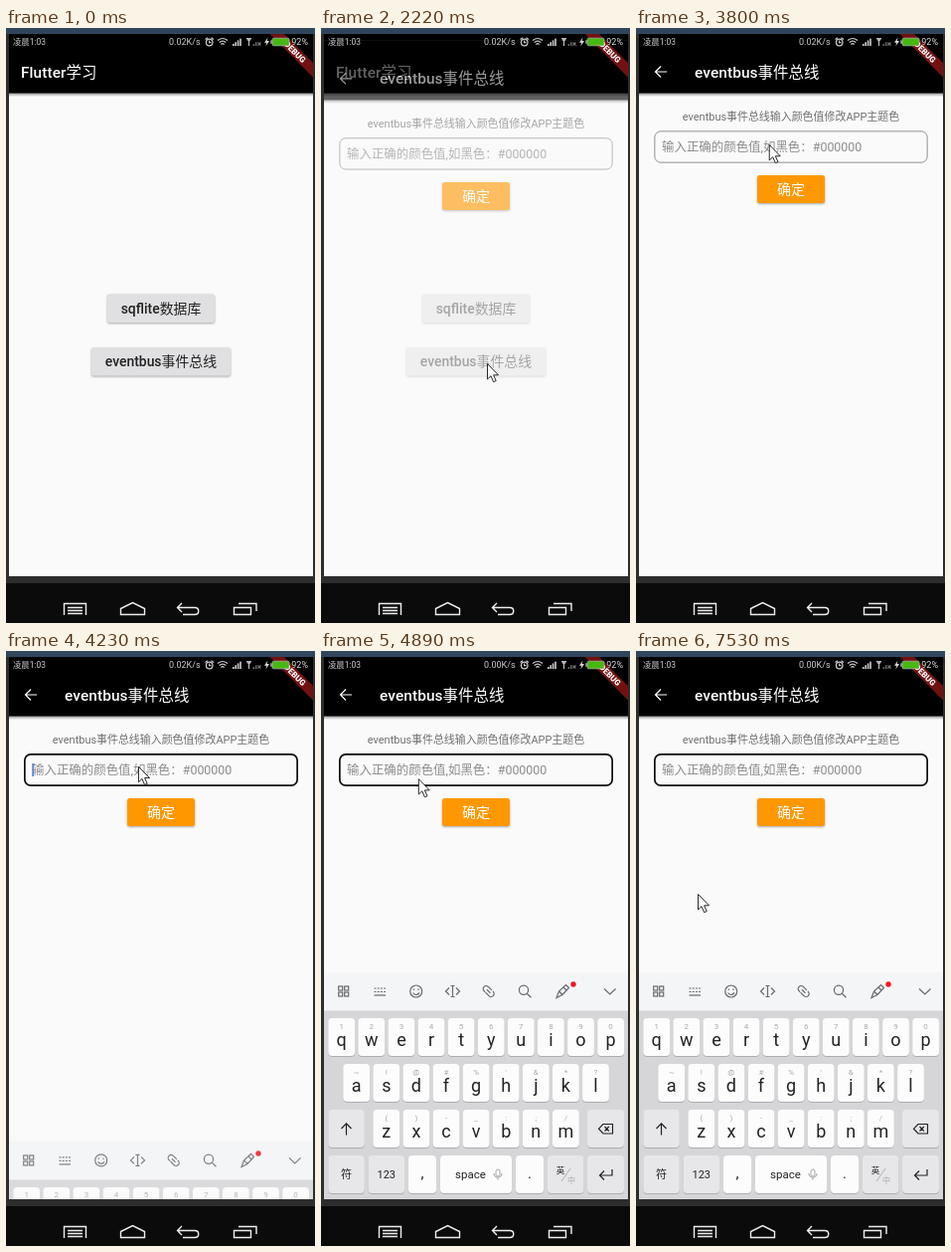
Write an HTML page that moves like this. It is 311 px wide and 598 px high and loops after 8000 ms.

```html
<!DOCTYPE html>
<html lang="zh-CN">
<head>
<meta charset="utf-8">
<style>
html, body { margin: 0; width: 100%; height: 100%; overflow: hidden; background: #2d2d2e }
svg { display: block; width: 311px; height: 598px }
text { font-family: Roboto, "Noto Sans CJK SC", "Noto Sans CJK", sans-serif; white-space: pre }
.cjk { font-weight: 400 }
.line { fill: none; stroke-width: 1.2 }
.raised { filter: drop-shadow(0 1px 1px #0005) }
</style>
</head>
<body>
<svg viewBox="0 0 311 598">
  <defs>
    <clipPath id="screen"><path d="M3 6H309V551H3Z"/></clipPath>
    <linearGradient id="fade" x2="0" y2="1"><stop stop-opacity=".45"/><stop offset="1" stop-opacity="0"/></linearGradient>
  </defs>
  <path fill="#2d2d2e" d="M0 0H311V598H0Z"/>
  <path fill="#30465d" d="M0 0H311V6H0Z"/>
  <g clip-path="url(#screen)">
    <g id="home"></g>
    <g id="page"></g>
    <g id="board"></g>
    <g id="banner" transform="translate(309 6) rotate(45)"></g>
    <g id="status"></g>
  </g>
  <path fill="#0b0b0b" d="M0 558H311V598H0Z"/>
  <g fill="none" stroke="#eee" stroke-width="1.4">
    <path d="M58.5 590V578.5H80.5V590M62 582.5H77M62 585.5H77M62 588.5H77"/>
    <path d="M115.5 589.5V583.5L127.5 577.5L139.5 583.5V589.5Z"/>
    <path d="M177 578L172.5 582.5L177 587M173 582.5H190C195 582.5 195 589.5 190 589.5H178"/>
    <path d="M229.5 582.5H246.5V589.5H229.5ZM234 578.5H252V586"/>
  </g>
  <path id="cursor" fill="#fff" stroke="#111" stroke-width=".9" d="M.5 .5V16L4 12.7 6.6 18.7 9.2 17.6 6.6 11.8H11.5Z"/>
</svg>
<script>
const $ = id => document.getElementById(id);
const mid = 'text-anchor="middle"', medium = 'font-weight="500"', raised = 'class="raised"';

// Latin runs keep the given weight, Chinese runs stay regular.
const text = (x, y, s, size, fill, extra = '') =>
  `<text x="${x}" y="${y}" font-size="${size}" fill="${fill}" ${extra}>` +
  s.replace(/[^\x00-\x7f]+/g, '<tspan class="cjk">$&</tspan>') + '</text>';
const box = (x, y, w, h, r, fill, extra = '') =>
  `<rect x="${x}" y="${y}" width="${w}" height="${h}" rx="${r}" fill="${fill}" ${extra}/>`;
const line = (d, color, extra = '') => `<path class="line" d="${d}" stroke="${color}" ${extra}/>`;
const ring = (x, y, r, color) => `<circle class="line" cx="${x}" cy="${y}" r="${r}" stroke="${color}"/>`;
const repeat = (n, make) => Array.from({length: n}, (_, i) => make(i)).join('');

const frame = (x, title) =>
  box(3, 6, 306, 545, 0, '#fafafa') + box(3, 65, 306, 4, 0, 'url(#fade)') + box(3, 6, 306, 59.5, 0, '#000') +
  text(x, 49.5, title, 15.4, '#fff', medium + ' letter-spacing=".1"');
const button = (y, w, h, label, size, fill, ink) =>
  box(156 - w / 2, y, w, h, 2.5, fill, raised) +
  text(156, y + h / 2 + 5, label, size, ink, mid + ' ' + medium);

$('home').innerHTML = frame(15, 'Flutter学习') +
  button(267.5, 108, 28.5, 'sqflite数据库', 13.9, '#e0dfe1', '#222') +
  button(321, 140, 28.5, 'eventbus事件总线', 13.9, '#e0dfe1', '#222');

$('page').innerHTML = frame(59, 'eventbus事件总线') +
  line('M31 44H20M25 38.5L19.5 44L25 49.5', '#fff') +
  text(156, 93, 'eventbus事件总线输入颜色值修改APP主题色', 10.95, '#707070', mid) +
  box(18.85, 103.85, 274.3, 31.3, 6, 'none', 'id="field"') +
  box(26.3, 113, 1.7, 13, 0, '#4285f4', 'id="caret"') +
  text(26, 124, '输入正确的颜色值,如黑色：#000000', 12.45, '#8c8c8c') +
  button(148, 68, 28, '确定', 14, '#ff9800', '#fff');

$('banner').innerHTML = box(-40, 20.5, 80, 10.2, 0, '#b71c1c', 'opacity=".63"') +
  text(0, 28.6, 'DEBUG', 8.3, '#fff', mid + ' font-weight="900"');

const bars = (x, n, fill) => repeat(n, i => box(x + i * 2.4, 16 - i * 1.8, 1.6, 2 + i * 1.8, 0, fill));
$('status').innerHTML =
  text(7, 17.3, '凌晨1:03', 8.4, '#ccc') +
  text(164, 17.3, '0.02K/s', 9, '#ccc', 'id="speed"') +
  ring(204.7, 14.5, 3.3, '#ccc') + line('M204.7 12.5V14.7H206.5M200.5 11.5L203 9.7M209 11.5L206.5 9.7', '#ccc') +
  repeat(3, i => line(`M${213 + i * 1.7} ${12.5 + i * 2}Q218 ${8.5 + i * 3.2} ${223 - i * 1.7} ${12.5 + i * 2}`, '#ccc')) +
  bars(228, 4, '#ccc') +
  line('M242 10.5H247M244.5 10.5V18M242.5 10.5L244.5 13.5L246.5 10.5', '#bbb') +
  bars(248.5, 2, '#666') + line('M253.5 14.5L256.5 17.5M256.5 14.5L253.5 17.5', '#777') +
  '<path fill="#ddd" d="M263.5 9.5L260 14.8H262.3L261.3 18.5L265 13H262.7Z"/>' +
  box(268, 10.2, 17, 7.6, 1.5, '#47b811', 'stroke="#bbb" stroke-width=".7"') + box(266.3, 12.3, 1.4, 3.4, 0, '#bbb') +
  text(287.3, 17.3, '92%', 9, '#ddd');

const white = '#fcfcfd', grey = '#e7e7ea', ink = '#222', tool = '#66696e';
const key = (x, y, w, fill = white, label = '', size = 11) =>
  box(x, y + 1, w, 38, 4, '#adaeb2') + box(x, y, w, 38, 4, fill) +
  text(x + w / 2, y + 23, label, size, ink, mid);
const row = (x, y, letters, hints) => repeat(letters.length, i => {
  const left = x + i * 30.1, center = left + 13.4;
  return key(left, y, 26.8) + text(center, y + 10.5, hints[i], 8, '#aaa', mid) +
    text(center, y + 28, letters[i], 18, ink, mid);
});

const tools =
  repeat(4, i => box(17.7 + i % 2 * 6, 337 + (i >> 1) * 6, 4, 4, 0, 'none', `stroke="${tool}" stroke-width="1.2"`)) +
  repeat(2, i => line(`M53.5 ${339 + i * 3.5}H65`, tool, 'stroke-dasharray="2 1.2"')) + line('M53.5 346H65', tool) +
  ring(95.7, 342, 6, tool) + line('M92.5 343.5Q95.7 347.5 99 343.5M93.3 339.5V341M98 339.5V341', tool) +
  line('M129 338.5L125.5 342L129 345.5M136 338.5L139.5 342L136 345.5M130.5 336.5H134.5M132.5 336.5V347.5M130.5 347.5H134.5', tool) +
  `<g transform="translate(168.7 342) rotate(45)">` +
  line('M1.5 -3H-3.5A3 3 0 0 0 -3.5 3H-2M-1.5 3H3.5A3 3 0 0 0 3.5 -3H3M-2.5 0H2.5', tool) + '</g>' +
  ring(204, 340.8, 4.6, tool) + line('M207.3 344.2L211.5 348.3', tool) +
  line('M237 348.5L239.5 342L246.5 335.5L249.5 338.5L243 345.5ZM239.5 342L243 345.5M244 338L247 341', tool, 'stroke-width=".9"') +
  '<circle cx="254" cy="335" r="2.7" fill="#f5161c"/>' +
  line('M285 339.5L290.8 345L296.6 339.5', tool);

$('board').innerHTML =
  box(3, 323, 306, 228, 0, '#d6d6d9') + box(3, 323, 306, 38.5, 0, '#f4f5f7') + tools +
  row(7.3, 369, 'qwertyuiop', '1234567890') +
  row(22.3, 415, 'asdfghjkl', "~!@#%'&*?") +
  row(52.4, 461, 'zxcvbnm', '()-_:;/') +
  key(7.3, 461, 36.5, grey) + line('M25.5 486.5V475M20.5 480L25.5 474.8L30.5 480', ink) +
  key(268, 461, 37, grey) + line('M284 475.5H293.5V485H284L279.5 480.2ZM285.5 478L289.8 482.5M289.8 478L285.5 482.5', ink) +
  key(7.3, 507, 36.5, grey, '符') + key(47.5, 507, 36.5, grey, '123') + key(88, 507, 28, white, ',', 15) +
  key(120, 507, 72) + text(135, 530, 'space', 11.5, ink) +
  box(176, 521, 4, 7, 2, 'none', 'stroke="#aaa"') + line('M174 525A4 4 0 0 0 182 525M178 529V531.5', '#aaa') +
  key(196, 507, 28, white, '.', 15) +
  key(228, 507, 36.5, grey) + text(241, 524.5, '英', 8.5, ink, mid) + text(252, 535, '中', 8, '#aaa', mid) +
  line('M242 533L251 520', '#bbb') +
  key(268, 507, 37, grey) + line('M293 521V527H281M285 522.5L280.5 527L285 531.5', ink);

// Where the pointer turns or rests: [ms, x, y]
const path = [
  [130, 87, 434], [370, 91, 416], [630, 163, 382], [1060, 168, 340], [1450, 167, 337], [2380, 167, 337],
  [2640, 162, 268], [3060, 135, 119], [4510, 132.5, 115], [4890, 98, 128], [5050, 61, 147],
  [5320, 45, 207], [5710, 62, 244], [8000, 62, 244]
];
const ramp = (t, start, length) => Math.min(1, Math.max(0, (t - start) / length));

function pointer(t) {
  const i = path.findIndex(p => p[0] > t);
  if (i < 1) return [-30, 0];
  const [a, b] = [path[i - 1], path[i]], k = ramp(t, a[0], b[0] - a[0]);
  return [a[1] + (b[1] - a[1]) * k, a[2] + (b[2] - a[2]) * k];
}

function draw(now) {
  const t = now % 8000;
  const enter = ramp(t, 1995, 300), rise = ramp(t, 4190, 300), focus = t >= 4080;

  $('cursor').setAttribute('transform', `translate(${pointer(t)})`);
  $('page').setAttribute('opacity', enter ** 1.75);
  $('page').setAttribute('transform', `translate(0 ${136 * (1 - enter) ** 2.13})`);
  $('field').setAttribute('stroke', focus ? '#0a0a0a' : '#858585');
  $('field').setAttribute('stroke-width', focus ? 1.7 : .9);
  $('caret').setAttribute('opacity', focus && Math.floor((t - 4015) / 489) % 2 === 0 ? 1 : 0);
  $('board').setAttribute('transform', `translate(0 ${228 * (1 - rise) ** 2})`);
  $('board').setAttribute('opacity', rise && Math.min(1, .7 + rise));
  $('speed').textContent = t < 4770 ? '0.02K/s' : '0.00K/s';
  requestAnimationFrame(draw);
}
draw(0);
</script>
</body>
</html>
```
